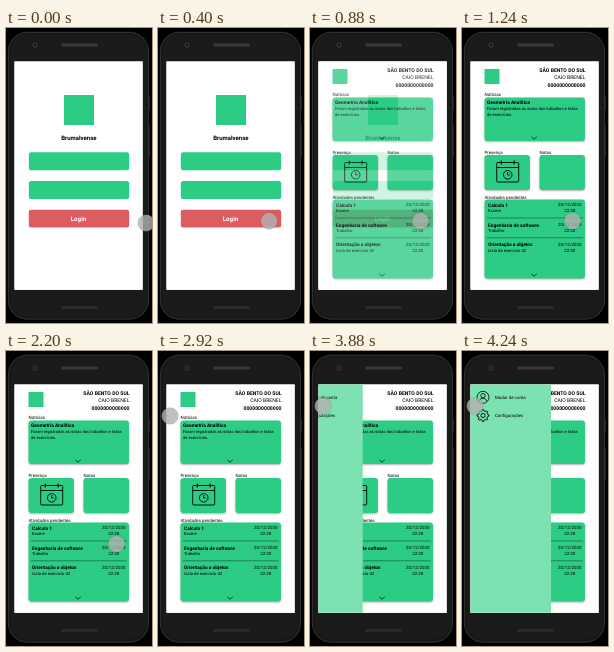
Write an HTML page with a canvas that moves like this. It is 146x295 px and loops after 4.72 s.

```html
<!DOCTYPE html>
<html lang="pt-BR">
<head>
<meta charset="utf-8">
<title>Aplicativo escolar</title>
<style>
html, body { margin: 0; width: 100%; height: 100%; overflow: hidden; background: #000; }
canvas { display: block; width: 100%; height: 100%; }
</style>
</head>
<body>
<canvas id="stage"></canvas>
<script>
const W = 146, H = 295, LOOP = 4720;
const GREEN = '#2ccc84', RED = '#dd5c60', MINT = '#7de2b2', INK = '#000';
const SCREEN = { x: 8.5, y: 33.5, w: 128.1, h: 228.3 };
const stage = document.getElementById('stage');
const main = stage.getContext('2d');
let home, scale;

const clamp = v => Math.max(0, Math.min(1, v));
const progress = (t, from, to) => clamp((t - from) / (to - from));
const easeSine = p => (1 - Math.cos(Math.PI * p)) / 2;
const easeCubic = p => p < 0.5 ? 4 * p ** 3 : 1 - 4 * (1 - p) ** 3;

function box(c, x, y, w, h, r, fill) {
  c.beginPath();
  c.roundRect(x, y, w, h, r);
  c.fillStyle = fill;
  c.fill();
}

function card(c, x, y, w, h) {
  c.save();
  c.shadowColor = 'rgba(0,0,0,.3)';
  c.shadowBlur = 2 * scale;
  c.shadowOffsetY = scale;
  box(c, x, y, w, h, 3, GREEN);
  c.restore();
}

// y is the middle of the capitals
function text(c, str, x, y, size, { bold = false, align = 'left', color = INK } = {}) {
  c.font = `${bold ? 700 : 400} ${size}px Roboto, sans-serif`;
  c.textRendering = 'geometricPrecision';
  c.textAlign = align;
  c.fillStyle = color;
  c.fillText(str, x, y + size * 0.355);
}

function line(c, points, width = 0.8, color = INK) {
  c.beginPath();
  points.forEach(([x, y]) => c.lineTo(x, y));
  c.strokeStyle = color;
  c.lineWidth = width;
  c.stroke();
}

function ring(c, x, y, r, width = 0.8) {
  c.beginPath();
  c.arc(x, y, r, 0, Math.PI * 2);
  c.strokeStyle = INK;
  c.lineWidth = width;
  c.stroke();
}

function chevron(c, x, y) {
  line(c, [[x - 2.8, y - 1.2], [x, y + 1.2], [x + 2.8, y - 1.2]], 0.7);
}

function calendar(c) {
  c.beginPath();
  c.roundRect(34.7, 134.5, 22, 19.5, 1);
  c.strokeStyle = INK;
  c.lineWidth = 0.9;
  c.stroke();
  line(c, [[34.7, 139.5], [56.7, 139.5]], 0.9);
  for (const x of [39.3, 52.1]) line(c, [[x, 132.5], [x, 136.5]], 1);
  ring(c, 45.7, 146.8, 4.3, 0.9);
  line(c, [[45.7, 144], [45.7, 147], [47.8, 147]]);
}

function drawPhone(c) {
  c.fillStyle = '#000';
  c.fillRect(0, 0, W, H);
  box(c, 142, 68, 2, 14, 0.8, '#242424');
  box(c, 142, 97, 2, 32, 0.8, '#242424');
  box(c, 1.8, 3.7, 141.2, 288, 19.5, '#2e2e2e');
  box(c, 3, 5, 138.8, 285.4, 18, '#171717');
  box(c, 4.5, 7, 135.8, 281.4, 17, '#1b1b1b');
  box(c, 55, 15.5, 37, 3, 1.5, '#383838');
  box(c, 55, 278, 37, 3, 1.5, '#2b2b2b');
  box(c, 26.5, 14.5, 5, 5, 2.5, '#363636');
  box(c, 27.8, 15.8, 2.4, 2.4, 1.2, '#111');
}

function drawPaper(c) {
  c.fillStyle = '#fff';
  c.fillRect(SCREEN.x, SCREEN.y, SCREEN.w, SCREEN.h);
}

function drawLogin(c) {
  drawPaper(c);
  box(c, 58, 67, 30, 30, 0, GREEN);
  text(c, 'Brumalvense', 72.8, 110, 6, { bold: true, align: 'center' });
  box(c, 22.8, 124.2, 100.4, 18, 2.5, GREEN);
  box(c, 22.8, 153, 100.4, 18, 2.5, GREEN);
  box(c, 22.8, 181.8, 100.4, 17.8, 2.5, RED);
  text(c, 'Login', 72.5, 190.7, 6.2, { bold: true, align: 'center', color: '#fff' });
}

function drawHome(c) {
  drawPaper(c);
  box(c, 22.5, 41, 15, 15, 0, GREEN);
  text(c, 'SÃO BENTO DO SUL', 123.5, 42, 5.1, { bold: true, align: 'right' });
  text(c, 'CAIO BRENEL', 123.5, 49.5, 5.1, { align: 'right' });
  text(c, '0000000000000', 123.5, 56.8, 5.1, { bold: true, align: 'right' });

  text(c, 'Notícias', 22.5, 66.3, 4.5);
  card(c, 22.5, 69.5, 100.5, 43.5);
  text(c, 'Geometria Analítica', 25, 74.2, 4.85, { bold: true });
  text(c, 'Foram registradas as notas dos trabalhos e listas', 25, 81, 4.15);
  text(c, 'de exercícios.', 25, 86.3, 4.15);
  chevron(c, 72, 110);

  text(c, 'Presença', 22.5, 124.3, 4.4);
  text(c, 'Notas', 77.5, 124.3, 4.4);
  card(c, 22.5, 127, 45.5, 35);
  card(c, 77.5, 127, 45.5, 35);
  calendar(c);

  text(c, 'Atividades pendentes', 22.5, 169, 4.4);
  card(c, 22.5, 171.5, 100.5, 79);
  const tasks = [
    ['Calculo 1', 'Exame'],
    ['Engenharia de software', 'Trabalho'],
    ['Orientação a objetos', 'Lista de exercicio 42']
  ];
  tasks.forEach(([title, kind], i) => {
    const y = 177 + i * 19.8;
    text(c, title, 26, y, 4.8, { bold: true });
    text(c, kind, 26, y + 5.8, 4.2);
    text(c, '20/12/2020', 107.7, y - 0.4, 4.4, { align: 'center' });
    text(c, '22:30', 107.7, y + 5.5, 4.4, { align: 'center' });
    if (i < 2) line(c, [[25, y + 13], [121, y + 13]], 0.7, '#14633f');
  });
  chevron(c, 72, 247);
}

function userIcon(c, x, y) {
  ring(c, x, y, 6);
  ring(c, x, y - 1.6, 2.2);
  c.beginPath();
  c.arc(x, y + 4.8, 3.8, Math.PI * 1.05, Math.PI * 1.95);
  c.stroke();
}

function gearIcon(c, x, y) {
  const points = [];
  for (let i = 0; i <= 32; i++) {
    const a = (i - 0.5) * Math.PI / 16;
    const r = i % 4 < 2 ? 6 : 4.5;
    points.push([x + r * Math.cos(a), y + r * Math.sin(a)]);
  }
  line(c, points, 0.9);
  ring(c, x, y, 2.1, 0.9);
}

function drawDrawer(c, open) {
  if (!open) return;
  c.save();
  c.beginPath();
  c.rect(SCREEN.x, SCREEN.y, SCREEN.w, SCREEN.h);
  c.clip();
  c.translate((open - 1) * 81, 0);
  c.fillStyle = MINT;
  c.fillRect(8, 33, 81, 229);
  userIcon(c, 21, 46.3);
  gearIcon(c, 21, 64.5);
  text(c, 'Mudar de conta', 33, 46.3, 4.4);
  text(c, 'Configurações', 33, 64.3, 4.4);
  c.restore();
}

function cursorAt(t) {
  if (t < 2540) {
    const p = easeSine(progress(t, 0, 440));
    return [140.2 - 29.7 * p, 195 - 2 * p];
  }
  const u = easeCubic(progress(t, 2520, 3080)), v = 1 - u;
  const curve = (a, b, d) => v * v * a + 2 * v * u * b + u * u * d;
  return [curve(110.5, 2, 13), curve(193, 108, 55)];
}

function drawCursor(c, t) {
  const [x, y] = cursorAt(t);
  c.save();
  c.shadowColor = 'rgba(0,0,0,.3)';
  c.shadowBlur = 2 * scale;
  c.beginPath();
  c.arc(x, y, 8, 0, Math.PI * 2);
  c.fillStyle = 'rgba(190,190,190,.75)';
  c.fill();
  c.restore();
  c.strokeStyle = 'rgba(165,165,165,.6)';
  c.lineWidth = 0.8;
  c.stroke();
}

function resize() {
  const ratio = window.devicePixelRatio || 1;
  stage.width = Math.round(innerWidth * ratio);
  stage.height = Math.round(innerHeight * ratio);
  scale = stage.width / W;
  home = document.createElement('canvas');
  home.width = stage.width;
  home.height = stage.height;
  const c = home.getContext('2d');
  for (const ctx of [main, c]) ctx.setTransform(scale, 0, 0, stage.height / H, 0, 0);
  drawHome(c);
}

function render(t) {
  const fade = easeSine(progress(t, 590, 1010));
  drawPhone(main);
  // both screens share the same paper, which stays opaque during the fade
  drawPaper(main);
  if (fade < 1) drawLogin(main);
  main.globalAlpha = fade;
  main.drawImage(home, 0, 0, W, H);
  main.globalAlpha = 1;
  drawDrawer(main, easeSine(progress(t, 3665, 4070)));
  drawCursor(main, t);
}

const start = performance.now();
function tick() {
  render((performance.now() - start) % LOOP);
  requestAnimationFrame(tick);
}
addEventListener('resize', resize);
resize();
tick();
</script>
</body>
</html>
```
